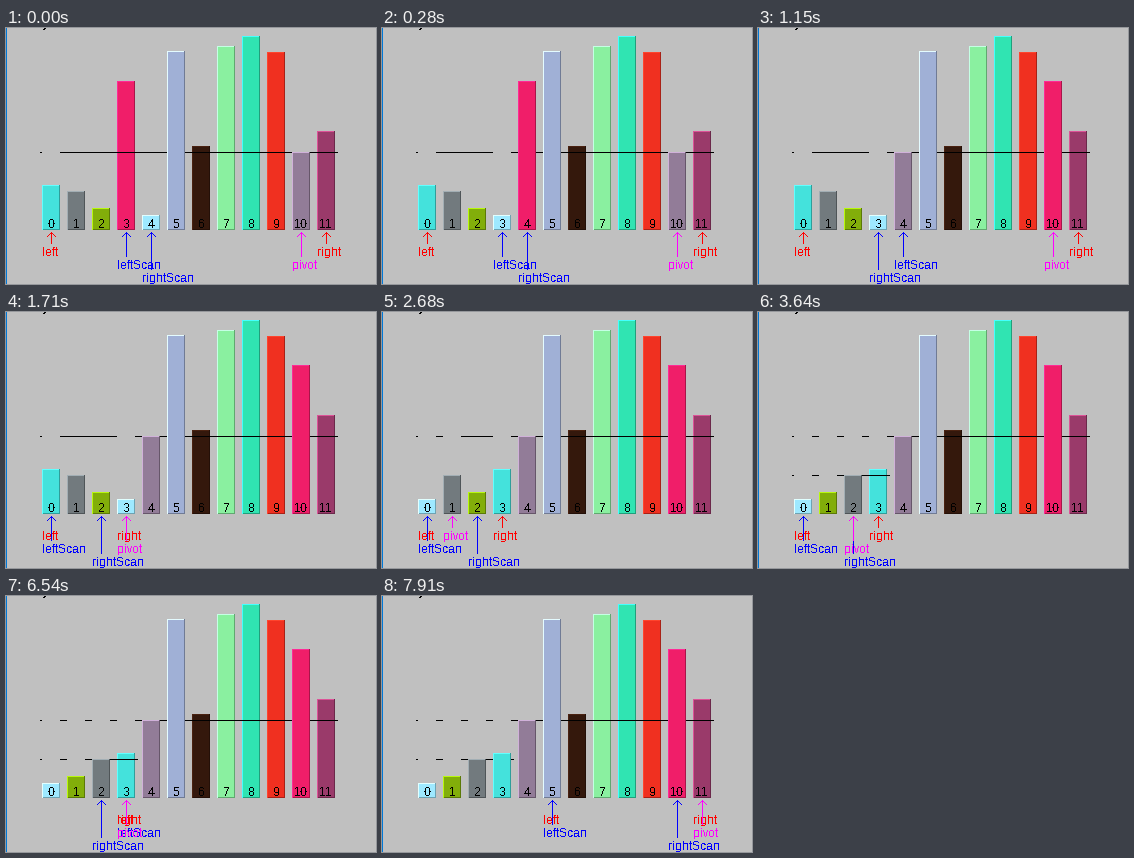
A matplotlib script for the animation above (8000 ms loop, 370 by 256 pixels).

```python
import numpy as np
import matplotlib.pyplot as plt
from matplotlib.animation import FuncAnimation
from matplotlib.collections import PolyCollection

W, H, DPI = 370, 256, 64
PX = 72 / DPI
LOOP, STEP = 8000, 20
X0, PITCH, BAR_W, FLOOR = 36, 25, 18, 202
GRAY = (192, 192, 192)

plt.rcParams.update({
    "font.family": "Liberation Sans",
    "text.antialiased": False,
    "text.hinting": "native",
    "text.hinting_factor": 1,
})

# top edge and colour of each bar, in starting order
BARS = [
    (157, (68, 226, 220)), (163, (114, 122, 126)), (180, (130, 174, 10)),
    (53, (240, 30, 105)), (187, (158, 233, 255)), (23, (160, 176, 214)),
    (118, (52, 24, 12)), (18, (138, 240, 160)), (8, (48, 228, 178)),
    (24, (240, 48, 32)), (124, (146, 124, 152)), (103, (154, 58, 106)),
]
# drawing order matters: later labels cover earlier ones
LABELS = {
    "left": ("#ff0000", 0), "right": ("#ff0000", 0),
    "leftScan": ("#0000ff", 1), "rightScan": ("#0000ff", 2),
    "pivot": ("#ff00ff", 1),
}


def bar_x(i):
    return X0 + PITCH * i


class Chart:
    """Canvas where redrawing a bar also wipes the pivot line in its column."""

    def __init__(self):
        self.order = list(BARS)
        self.img = np.full((H, W, 3), GRAY, np.uint8)
        self.img[:, 0] = (0, 120, 215)
        self.img[0, 38:40] = self.img[1, 37:39] = 0
        self.redraw(*range(len(BARS)))

    def redraw(self, *indices):
        for i in indices:
            x, (top, color) = bar_x(i), self.order[i]
            color = np.array(color)
            light, dark = np.minimum(color / 0.7, 255), color * 0.7
            right = x + BAR_W
            self.img[2:FLOOR, x:right] = GRAY
            self.img[top:FLOOR, x:right] = color
            self.img[top:FLOOR, x] = light
            self.img[top, x:right - 1] = light
            self.img[FLOOR - 1, x + 1:right] = dark
            self.img[top:FLOOR, right - 1] = dark

    def swap(self, i, j):
        self.order[i], self.order[j] = self.order[j], self.order[i]
        self.redraw(i, j)

    def line(self, y, first, last):
        self.img[y, bar_x(first) - 2:bar_x(last) + 21] = 0


def entry(left, right):
    return dict(left=left, right=right, leftScan=left,
                rightScan=right - 1, pivot=right)


def build_scenes():
    chart, scenes = Chart(), []
    marks = dict(left=0, right=11, leftScan=3, rightScan=4, pivot=10)

    def scene(time, pivot_row=1, **moved):
        marks.update(moved)
        scenes.append((time, chart.img.copy(), dict(marks), pivot_row))

    chart.line(124, 0, 11)
    chart.redraw(0, 5, 10)
    scene(0)
    chart.swap(3, 4)
    scene(280)
    scene(710, leftScan=4, rightScan=3)
    chart.swap(4, 10)
    scene(1150)
    scene(1710, **entry(0, 3))
    chart.swap(0, 3)
    chart.redraw(1)
    scene(2680, pivot=1, pivot_row=0)
    chart.line(163, 0, 3)
    scene(3240, pivot_row=0)
    chart.swap(1, 2)
    chart.redraw(0)
    scene(3640, pivot=2)
    scene(4200, leftScan=2, rightScan=1)
    scene(5040, **entry(0, 1))
    scene(6540, **entry(3, 3))
    chart.redraw(3)
    scene(7350)
    scene(7910, **entry(5, 11))
    return scenes


def box(x, y, w=1, h=1):
    return [(x, y), (x + w, y), (x + w, y + h), (x, y + h)]


def arrow_boxes(i, row):
    x, y = bar_x(i) + 9, 204
    head = [box(x + s * d, y + d) for d in range(1, 5) for s in (-1, 1)]
    return [box(x, y, 1, 12 + 13 * row)] + head


fig = plt.figure(figsize=(W / DPI, H / DPI), dpi=DPI)
ax = fig.add_axes([0, 0, 1, 1])
ax.axis("off")
SCENES = build_scenes()
picture = ax.imshow(SCENES[0][1], extent=(0, W, H, 0),
                    interpolation="nearest", aspect="auto")
ax.set(xlim=(0, W), ylim=(H, 0))

for i in range(len(BARS)):
    ax.text(bar_x(i) + (6 if i < 10 else 2), 200, str(i),
            size=12 * PX, va="baseline", zorder=2)

tags = {}
for z, (name, (color, row)) in enumerate(LABELS.items()):
    arrow = PolyCollection([], facecolors=color, linewidths=0,
                           antialiaseds=False, zorder=3 + 2 * z)
    ax.add_collection(arrow, autolim=False)
    text = ax.text(0, 0, name, color=color, size=12 * PX,
                   va="baseline", zorder=4 + 2 * z)
    tags[name] = arrow, text


def update(frame):
    end = (frame + 1) * STEP
    _, img, marks, pivot_row = [s for s in SCENES if s[0] < end][-1]
    picture.set_data(img)
    for name, (arrow, text) in tags.items():
        row = pivot_row if name == "pivot" else LABELS[name][1]
        arrow.set_verts(arrow_boxes(marks[name], row))
        text.set_position((bar_x(marks[name]), 228 + 13 * row))
    return [picture]


anim = FuncAnimation(fig, update, frames=LOOP // STEP, interval=STEP,
                     init_func=lambda: update(0), repeat=True, repeat_delay=0)
plt.show()
```
